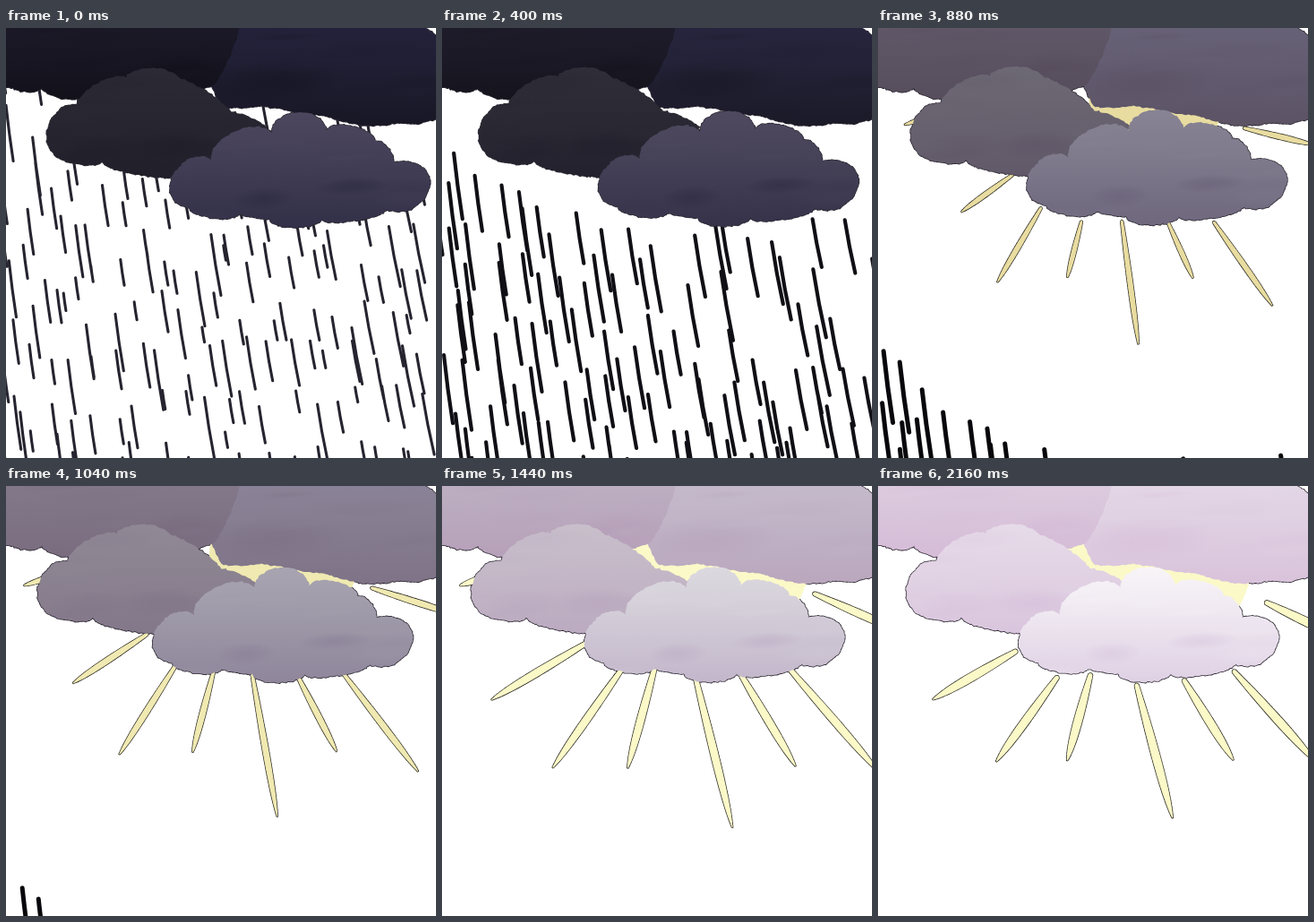
Animation of 480 by 480 pixels, one loop 2.24 s. Source, as an HTML page with a canvas:

```html
<!DOCTYPE html>
<html lang="en">
<head>
<meta charset="utf-8">
<title>Rain clearing</title>
<style>
html, body { margin: 0; width: 100%; height: 100%; overflow: hidden; background: #fff; }
canvas { display: block; width: 480px; height: 480px; }
</style>
</head>
<body>
<canvas id="stage" width="480" height="480"></canvas>
<script>
const ctx = document.getElementById('stage').getContext('2d');
const LOOP = 2240, STEP = 80;

let seed = 11;
function rnd() {
  seed = (seed * 1664525 + 1013904223) % 4294967296;
  return seed / 4294967296;
}
const spread = size => (rnd() - 0.5) * size;

const mix = (a, b, k) => a + (b - a) * k;
const part = (t, from, to) => Math.max(0, Math.min(1, (t - from) / (to - from)));
const easeOut = u => 1 - (1 - u) ** 1.5;
const swell = u => Math.sin(Math.PI * u);

const rgb = hex => [0, 2, 4].map(i => parseInt(hex.substr(i, 2), 16));
const blend = (a, b, k) => a.map((v, n) => Math.round(mix(v, b[n], k)));
const css = (c, alpha = 1) => `rgba(${c.join()},${alpha})`;

// How far the sky has cleared, from 0 (storm) to 1 (calm).
const CLEARING = [[0, 0], [400, 0.015], [720, 0.1], [880, 0.35], [1200, 0.72], [1760, 1]];
function clearing(t) {
  const i = CLEARING.findIndex(key => key[0] > t);
  if (i < 0) return 1;
  const [t0, a] = CLEARING[i - 1], [t1, b] = CLEARING[i];
  return mix(a, b, part(t, t0, t1));
}

// Joins corners (x, y, bulge) clockwise with rough arcs that swell outwards.
function puffs(...corners) {
  const path = new Path2D();
  corners.forEach(([x, y, bulge], i) => {
    const [x2, y2] = corners[(i + 1) % corners.length];
    const dx = x2 - x, dy = y2 - y, len = Math.hypot(dx, dy);
    const steps = Math.ceil((len + bulge) / 3);
    for (let s = 0; s < steps; s++) {
      const u = s / steps;
      const along = 3 * u * (1 - u) ** 2 * 0.1 + 3 * u * u * (1 - u) * 0.9 + u ** 3;
      const out = 4 * u * (1 - u) * bulge / len;
      path.lineTo(x + dx * along + dy * out + spread(1.6), y + dy * along - dx * out + spread(1.6));
    }
  });
  path.closePath();
  return path;
}

// box: x, y, width, height; storm and calm: light and dark tone;
// shade: dark patches as x, y, rx, ry; drift: first and last offset.
function makeCloud({ path, box: [x, y, w, h], storm, calm, shade, drift = [0, 0] }) {
  const patches = shade.map(s => [...s, -0.6]);
  for (let i = 0; i < 16; i++) {
    patches.push([x + rnd() * w, y + rnd() * h, 25 + rnd() * 45, 4 + rnd() * 8, spread(0.6)]);
  }
  return { path, top: y, bottom: y + h, storm: storm.map(rgb), calm: calm.map(rgb), patches, drift };
}

const clouds = [
  {
    path: puffs([190, -20, 0], [462, -20, 0], [468, 0, 2], [500, 30, 0], [500, 101, 0],
      [472, 103, 3], [440, 105, 2], [395, 108, 1], [358, 98, 1], [310, 91, 0], [285, 87, 2], [240, 87, 0]),
    box: [240, 0, 240, 108], storm: ['24223b', '151420'], calm: ['e3d6e5', 'd6bed9'],
    shade: [[300, 60, 80, 24]]
  },
  {
    path: puffs([-20, -20, 0], [262, -20, 8], [228, 66, 0], [150, 85, 0], [75, 79, 4],
      [40, 67, 4], [8, 67, 0], [-20, 66, 0]),
    box: [0, 0, 250, 80], storm: ['1b1927', '100f17'], calm: ['dccade', 'd3b7d5'],
    shade: [[190, 50, 70, 22]]
  },
  {
    path: puffs([40, 136, 18], [68, 84, 10], [122, 53, 11], [182, 55, 5], [238, 92, 3],
      [280, 110, 0], [215, 152, 4], [160, 164, 2], [105, 154, 1], [95, 147, 8]),
    box: [35, 43, 220, 122], storm: ['2c2b35', '1d1c27'], calm: ['e6dbe8', 'd6bfda'],
    shade: [[85, 133, 50, 15], [175, 130, 55, 16]], drift: [12, -2]
  },
  {
    path: puffs([165, 188, 21], [207, 143, 18], [274, 113, 21], [336, 110, 10], [390, 122, 6],
      [410, 147, 32], [430, 199, 2], [403, 199, 7], [330, 210, 9], [272, 210, 1],
      [238, 204, 8], [182, 197, 2]),
    box: [160, 90, 294, 128], storm: ['4c475e', '2c2a42'], calm: ['f8f5f8', 'd9c8df'],
    shade: [[265, 187, 34, 13], [365, 173, 42, 10]], drift: [22, -4]
  }
].map(makeCloud);

// Drops fall as one sheet; its upper edge trails on the left.
const FALL = 44 / STEP, DRIFT = 6 / STEP;
const drops = [];
for (let col = -70; col < 480; col += 24) {
  const edge = 140 * (1 - Math.exp(-Math.max(0, col + 30) / 80)) - 146;
  for (let y = 470; y > edge; y -= 52) {
    const sparse = col > 150 && y < edge + 130 && rnd() < 0.45;
    if (!sparse) drops.push({ x: col + spread(22), y: Math.max(edge, y + spread(44)), u: rnd() });
  }
}

// Rays as x1, y1, x2, y2 when they break through and when they settle.
const rays = [
  [[70, 95, 42, 104], [70, 95, 42, 104]],
  [[142, 163, 114, 187], [160, 181, 67, 235]],
  [[172, 205, 141, 264], [204, 208, 136, 302]],
  [[222, 226, 215, 256], [239, 204, 213, 300]],
  [[269, 223, 278, 333], [287, 216, 327, 364]],
  [[323, 226, 333, 258], [338, 211, 393, 300]],
  [[374, 227, 418, 298], [393, 202, 484, 303]],
  [[410, 109, 463, 116], [427, 127, 510, 167]]
];

function rayPath([from, to], t) {
  const settle = easeOut(part(t, 720, 1760));
  let [x1, y1, x2, y2] = from.map((v, i) => mix(v, to[i], settle));
  const grow = part(t, 560, 720);
  x2 = mix(x1, x2, grow);
  y2 = mix(y1, y2, grow);
  const angle = Math.atan2(y2 - y1, x2 - x1);
  const reach = 28 * swell(part(t, 720, 1760));
  const slide = 45 * swell(part(t, 1760, 2180));
  const start = slide - reach * 0.4;
  const len = Math.hypot(x2 - x1, y2 - y1) + slide + reach - start;
  const w = mix(2.6, 4.8, settle) * Math.min(1, 0.4 + len / 130);
  const ux = Math.cos(angle), uy = Math.sin(angle);
  const pt = (f, side) => [
    x1 + ux * (start + len * f) - uy * side,
    y1 + uy * (start + len * f) + ux * side
  ];
  const path = new Path2D();
  path.moveTo(...pt(0, -w * 0.5));
  path.bezierCurveTo(...pt(0.3, -w), ...pt(0.8, -w * 1.4), ...pt(1, -0.5));
  path.lineTo(...pt(1, 0.5));
  path.bezierCurveTo(...pt(0.8, w * 1.4), ...pt(0.3, w), ...pt(0, w * 0.5));
  path.quadraticCurveTo(...pt(-0.03, 0), ...pt(0, -w * 0.5));
  return path;
}

function drawRain(t) {
  const k = part(t, 0, 720);
  ctx.strokeStyle = css(blend(rgb('25242f'), rgb('08080c'), Math.sqrt(k)));
  ctx.lineWidth = mix(3.1, 5, k);
  ctx.lineCap = 'round';
  ctx.beginPath();
  for (const d of drops) {
    const x = d.x + DRIFT * t, y = d.y + FALL * t;
    const len = mix(16 + 52 * d.u, 74 + 12 * d.u, k);
    const lean = len * (0.13 + x / 480 * 0.07);
    ctx.moveTo(x, y);
    ctx.quadraticCurveTo(x + lean * 0.4, y + len * 0.5, x + lean, y + len);
  }
  ctx.stroke();
}

function drawSun(t) {
  if (t <= 560) return;
  ctx.fillStyle = css(blend(rgb('e8dca0'), rgb('fbf9c8'), part(t, 880, 1250)));
  ctx.strokeStyle = '#2c2a22';
  ctx.lineWidth = 1.5;
  ctx.setLineDash([3, 1]);
  for (const ray of rays) {
    const path = rayPath(ray, t);
    ctx.stroke(path);
    ctx.fill(path);
  }
  ctx.setLineDash([]);
  const r = mix(65, 108, easeOut(part(t, 720, 1760))) * part(t, 480, 720);
  ctx.beginPath();
  ctx.arc(310, 80, r, 0, Math.PI * 2);
  ctx.fill();
}

function edge(cloud) {
  ctx.strokeStyle = '#2b2630';
  ctx.lineWidth = 1.7;
  ctx.setLineDash([2.5, 1.5]);
  ctx.stroke(cloud.path);
}

function paint(cloud, t) {
  const [light, dark] = cloud.storm.map((c, i) => blend(c, cloud.calm[i], clearing(t)));
  const g = ctx.createLinearGradient(0, cloud.top, 0, cloud.bottom);
  g.addColorStop(0, css(light));
  g.addColorStop(0.4, css(blend(light, dark, 0.28)));
  g.addColorStop(1, css(blend(light, dark, 0.8)));
  ctx.fillStyle = g;
  ctx.fill(cloud.path);
  ctx.clip(cloud.path);
  for (const [x, y, rx, ry, power] of cloud.patches) {
    const c = power > 0 ? light : dark;
    ctx.save();
    ctx.translate(x, y);
    ctx.rotate(-0.06);
    ctx.scale(rx, ry);
    const soft = ctx.createRadialGradient(0, 0, 0, 0, 0, 1);
    soft.addColorStop(0, css(c, Math.abs(power)));
    soft.addColorStop(0.5, css(c, Math.abs(power) * 0.6));
    soft.addColorStop(1, css(c, 0));
    ctx.fillStyle = soft;
    ctx.fillRect(-1, -1, 2, 2);
    ctx.restore();
  }
}

function eachCloud(t, action) {
  const k = easeOut(part(t, 0, 1760));
  for (const cloud of clouds) {
    ctx.save();
    const dx = mix(...cloud.drift, k);
    ctx.translate(dx, Math.max(0, dx * 0.17));
    action(cloud, t);
    ctx.restore();
  }
}

function draw(t) {
  ctx.fillStyle = '#fff';
  ctx.fillRect(0, 0, 480, 480);
  drawRain(t);
  eachCloud(t, edge);
  drawSun(t);
  eachCloud(t, paint);
}

const start = performance.now();
let shown = -1;
function tick() {
  const t = Math.floor(((performance.now() - start) % LOOP) / STEP) * STEP;
  if (t !== shown) draw(shown = t);
  requestAnimationFrame(tick);
}
tick();
</script>
</body>
</html>
```
